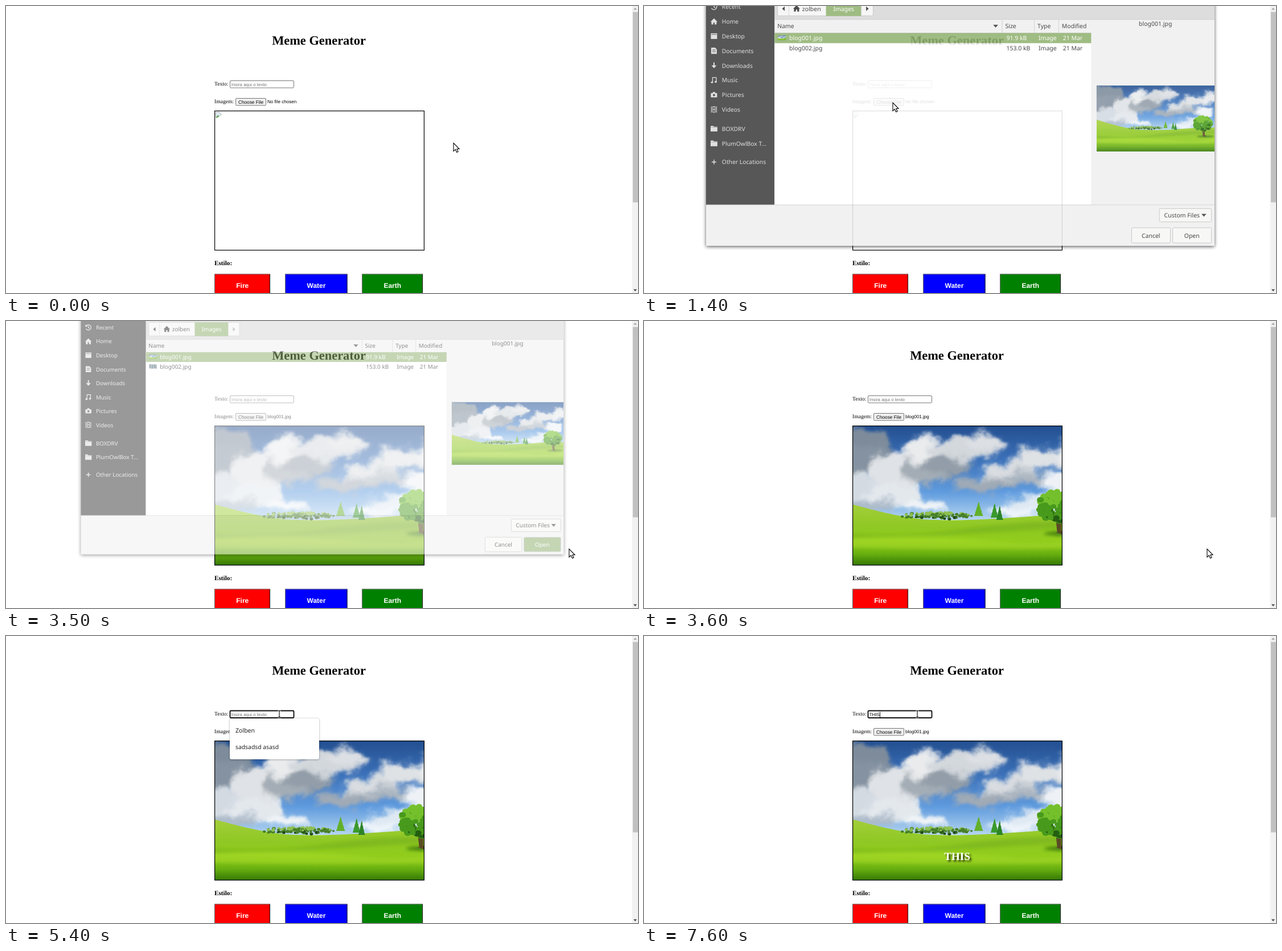
Animation of 1110 by 505 pixels, one loop 8000 ms. Source, as an HTML page:

```html
<!DOCTYPE html>
<html lang="pt">
<head>
<meta charset="utf-8">
<title>Meme Generator</title>
<style>
  html, body { margin: 0; width: 100%; height: 100%; overflow: hidden; background: #fff; }
  svg { display: block; width: 1110px; height: 505px; }
  text { text-rendering: geometricPrecision; white-space: pre; }
  .serif { font-family: "Liberation Serif", serif; font-size: 9.6px; }
  .sans { font-family: "Liberation Sans", sans-serif; font-size: 8.1px; }
  .ui { font-family: "Noto Sans", sans-serif; font-size: 10.55px; fill: #303030; }
  .bold { font-weight: bold; }
  .mid { text-anchor: middle; }
</style>
</head>
<body>
<svg viewBox="0 0 1110 505">
  <defs>
    <linearGradient id="sky" x2="0" y2="1">
      <stop stop-color="#234f90"/><stop offset=".35" stop-color="#3b70b8"/>
      <stop offset=".7" stop-color="#5f9bde"/><stop offset="1" stop-color="#b5d5f0"/>
    </linearGradient>
    <linearGradient id="grass" gradientUnits="userSpaceOnUse" x1="0" y1="318" x2="0" y2="430">
      <stop stop-color="#a5cf3c"/><stop offset=".4" stop-color="#8fc824"/>
      <stop offset=".6" stop-color="#90cc1c"/><stop offset=".82" stop-color="#68b010"/>
      <stop offset="1" stop-color="#347606"/>
    </linearGradient>
    <filter id="puff" x="-10%" y="-10%" width="120%" height="120%">
      <feGaussianBlur stdDeviation="4" result="soft"/>
      <feTurbulence type="fractalNoise" baseFrequency=".028" numOctaves="4" seed="4"/>
      <feDisplacementMap in="soft" scale="34" xChannelSelector="R" yChannelSelector="G"/>
    </filter>
    <filter id="haze"><feGaussianBlur stdDeviation="3"/></filter>
    <filter id="shade" x="-5%" y="-5%" width="110%" height="110%"><feGaussianBlur stdDeviation="3.2"/></filter>
    <symbol id="meadow" viewBox="333 185 436 245" preserveAspectRatio="xMidYMid slice"></symbol>
  </defs>
  <rect width="1110" height="505" fill="#fff"/>
  <g id="page"></g>
  <g id="dialog"></g>
  <g id="popup"></g>
  <path id="arrow" d="M0 0V14.4L3.3 11.4 5.7 16.4 8.1 15.3 5.9 10.5H10Z" fill="#fff" stroke="#000" stroke-width="1.1"/>
  <g id="beam" fill="none">
    <path d="M-3-6Q0-6 0-4.500Q0-6 3-6M0-5V5M-3 6Q0 6 0 4.500Q0 6 3 6" stroke="#fff" stroke-width="2.6"/>
    <path d="M-3-6Q0-6 0-4.500Q0-6 3-6M0-5V5M-3 6Q0 6 0 4.500Q0 6 3 6" stroke="#000" stroke-width="1.1"/>
  </g>
</svg>
<script>
const $ = id => document.getElementById(id);
const rect = (x, y, w, h, fill, more = '') =>
  `<rect x="${x}" y="${y}" width="${w}" height="${h}" fill="${fill}" ${more}/>`;
const label = (x, y, str, cls, more = '') => `<text x="${x}" y="${y}" class="${cls}" ${more}>${str}</text>`;
const path = (d, fill, more = '') => `<path d="${d}" fill="${fill}" ${more}/>`;
const blob = ([x, y, rx, ry, fill]) => `<ellipse cx="${x}" cy="${y}" rx="${rx}" ry="${ry}" fill="${fill}"/>`;

let seed = 7;
const random = () => (seed = seed * 16807 % 2147483647) / 2147483647;

function foliage(count, cx, cy, rx, ry, size, colors) {
  let out = '';
  for (let i = 0; i < count; i++) {
    const a = random() * 2 * Math.PI, r = Math.sqrt(random());
    const dy = r * Math.sin(a);
    const tone = Math.min(2, Math.max(0, Math.floor(1.6 - dy + random() - .5)));
    const s = size * (.6 + .6 * random());
    out += blob([(cx + rx * r * Math.cos(a)).toFixed(1), (cy + ry * dy).toFixed(1), s.toFixed(1), (s * .8).toFixed(1), colors[tone]]);
  }
  return out;
}

function conifer(x, top, half, fill) {
  let d = `M${x} ${top}`;
  for (let i = 1; i <= 4; i++) d += `L${x + half * i / 4} ${top + 6.5 * i}l${-half / 8} 0`;
  d += `H${x}`;
  for (let i = 4; i >= 1; i--) d += `L${x - half * i / 4} ${top + 6.5 * i}L${x - half * (i - 1) / 4} ${top + 6.5 * i - 5}`;
  return path(d + 'Z', fill);
}

function meadow() {
  const clouds = [
    [375, 215, 60, 32, '#7d8b9b'], [350, 255, 50, 32, '#8794a3'], [400, 245, 40, 22, '#8492a1'],
    [445, 265, 50, 32, '#dfe2e6'], [500, 262, 48, 24, '#a4adb6'], [495, 226, 38, 22, '#e9ebed'],
    [560, 226, 60, 20, '#d3d8dd'], [600, 212, 36, 15, '#dcdfe3'], [530, 256, 44, 18, '#929da9'],
    [375, 300, 60, 28, '#d3dae2'], [440, 305, 52, 22, '#e3e8ed'], [400, 325, 45, 10, '#adbccb'],
    [490, 328, 36, 12, '#eef3f7'], [600, 287, 58, 12, '#a0aab6'], [645, 266, 50, 18, '#d9dde1'],
    [700, 240, 48, 19, '#dfe2e5'], [755, 230, 36, 22, '#e6e9ec'], [680, 275, 55, 10, '#a9b4c0'],
    [735, 288, 34, 24, '#eef2f6'], [690, 320, 48, 15, '#dfe9f3'], [650, 337, 40, 9, '#eef4fa']
  ];
  const hill = 'M333 312Q350 316 367 323C405 333 440 343 490 349C560 353 620 348 690 343L769 341V430H333Z';
  return rect(333, 185, 436, 165, 'url(#sky)') +
    `<g filter="url(#puff)">${clouds.map(blob).join('')}</g>` +
    path(hill, 'url(#grass)') +
    `<g filter="url(#haze)">` +
      path('M333 372Q450 382 560 366T769 352V362Q620 372 540 376T333 382Z', '#6ca812', 'opacity=".45"') +
      path('M333 385Q470 376 600 386T769 380V400Q560 404 333 398Z', '#b0e02a', 'opacity=".5"') +
      blob([735, 374, 32, 3, '#2d6b0a']) + '</g>' +
    foliage(110, 512, 343, 66, 6, 3, ['#8fbf52', '#47802a', '#234b17'].reverse()) +
    conifer(588, 317, 8, '#62b02a') + conifer(616, 320, 7, '#3a9a2c') + conifer(625, 324, 6, '#2c8426') +
    path('M723 345L726 372H722L734 375 738 372 733 369V345Z', '#5a4a24') +
    foliage(190, 727, 326, 34, 27, 5.5, ['#245f10', '#489a1c', '#74c02c']);
}

function styleButton(x, w, fill, name) {
  return rect(x, 471.500, w, 40, fill) +
    path(`M${x} 512V472H${x + w}`, 'none', 'stroke="#6b6b6b" stroke-width="1.1"') +
    path(`M${x + w - .5} 472V512`, 'none', 'stroke="#222" stroke-width="1.1"') +
    label(x + w / 2, 496, name, 'sans bold mid', 'fill="#fff" style="font-size:12px"');
}

function page() {
  return label(549.5, 67.5, 'Meme Generator', 'serif bold mid', 'style="font-size:22.4px"') +
    label(366, 140, 'Texto:', 'serif') +
    rect(393.5, 131.5, 112, 12.5, '#fff', 'id="field" rx="1.5" stroke="#767676"') +
    label(395.7, 141, 'Insira aqui o texto', 'sans', 'id="hint" fill="#757575" style="font-size:7.9px"') +
    label(395.7, 141, '', 'sans', 'id="typed" style="font-size:8px"') +
    rect(396.5, 133.5, .9, 9.5, '#000', 'id="caret"') +
    label(366, 171, 'Imagem:', 'serif') +
    rect(403.5, 162.5, 53, 12.5, '#efefef', 'id="choose" rx="1.5" stroke="#767676"') +
    label(430, 171.8, 'Choose File', 'sans mid', 'style="font-size:8.25px"') +
    label(459, 171, 'No file chosen', 'sans', 'id="file"') +
    `<g id="broken">` + path('M368.5 187H375L378 190V196.500H368.500Z', '#dfe9f5', 'stroke="#a9a9a9" stroke-width=".8"') +
      path('M369 196L372 192 375 194 378 191V193L370 196.500Z', '#5aa64a') +
      path('M371 197L379 191V198H371Z', '#fff') + '</g>' +
    `<use id="photo" href="#meadow" x="367" y="185" width="367.500" height="245"/>` +
    rect(366.6, 184.600, 367.800, 245, 'none', 'stroke="#000" stroke-width="1.2"') +
    label(550, 394, '', 'serif bold mid', 'id="caption" fill="#fff" style="font-size:19px;filter:drop-shadow(3px 3px 1.500px rgba(0,0,0,.75))"') +
    label(366, 455.5, 'Estilo:', 'serif bold', 'style="font-size:11.23px"') +
    styleButton(366.5, 97.5, '#f00', 'Fire') +
    styleButton(490.5, 109, '#00f', 'Water') +
    styleButton(625.5, 106.5, '#008000', 'Earth') +
    rect(1099.5, 0, 10.5, 505, '#f1f1f1') + rect(1101, 10.5, 9, 335, '#c1c1c1') +
    path('M1102 6.500L1105 3 1108 6.500Z', '#a3a3a3') + path('M1102 498.500L1105 502 1108 498.500Z', '#404040');
}

const folder = path('M-6-5H-1L0-3.500H6V5H-6Z', '#dcdcdc') + path('M-6-2.500H6', 'none', 'stroke="#8a8a8a" stroke-width=".7"');
const line = (d, w = 1.3) => path(d, 'none', `stroke="#dcdcdc" stroke-width="${w}"`);
const solid = d => path(d, '#dcdcdc', 'fill-rule="evenodd"');
const house = 'M0-5.500L6 .5H4.500V5.500H1.200V2H-1.200V5.500H-4.500V.5H-6Z';
const places = [
  [0, 'Recent', line('M-4-3A5 5 0 1 1-4.500 2.500M-5-5V-2H-2M0-3V.5L2.500 2')],
  [26, 'Home', solid(house)],
  [52, 'Desktop', solid('M-5.500-5H5.500V5H-5.500ZM-4.500-3.500V-2.500H4.500V-3.500Z')],
  [78, 'Documents', solid('M-5-5.500H2L5-2.500V5.500H-5ZM-3-2V-1H3V-2ZM-3 1V2H3V1Z')],
  [104, 'Downloads', solid('M-1-5.500H1V0H4.500L0 5-4.500 0H-1Z')],
  [130, 'Music', line('M-2.500 3.500V-4.500H4V2.500') + blob([-3.5, 3.8, 1.9, 1.6, '#dcdcdc']) + blob([3, 3, 1.9, 1.6, '#dcdcdc'])],
  [156, 'Pictures', solid('M-5.500-3H-2.500L-1.500-5H1.500L2.500-3H5.500V4.500H-5.500ZM0-1.500A2 2 0 1 0 .1-1.500Z')],
  [182, 'Videos', line('M-4.500-5.500V5.500M4.500-5.500V5.500M-2-5.500V5.500M2-5.500V5.500M-2-5H2M-2 0H2M-2 5H2', 1.1)],
  [216, 'BOXDRV', folder],
  [242, 'PlumOwlBox T...', folder],
  [275, 'Other Locations', line('M-4 0H4M0-4V4', 1.5)]
];

function fileRow(y, name, size, more) {
  return [[253, name], [637, size], [694, 'Image'], [737, '21 Mar']]
    .map(([x, str]) => label(x, y, str, 'ui', more)).join('');
}

const uiButton = (x, y, w, h, id = '') =>
  rect(x + .5, y + .5, w - 1, h - 1, '#f6f6f5', `id="${id}" rx="2" stroke="#c2c2c2"`);

function dialog() {
  const white = 'style="fill:#fff"';
  return rect(106, -30, 899, 455, '#000', 'filter="url(#shade)" opacity=".75"') +
    rect(106, -30, 899, 453.5, '#f0f0f0') +
    rect(227, -30, 778, 53, '#d9d9d9') +
    rect(232.5, -9.5, 169, 25.5, '#f5f5f5', 'rx="2" stroke="#c2c2c2"') +
    path('M252.500-9V16M380.500-9V16', 'none', 'stroke="#cfcfcf"') +
    rect(318, -9.5, 62, 26, '#92b372') +
    path('M245-.500V7.500L240.500 3.500Z', '#303030') + path('M389-.500V7.500L393.500 3.500Z', '#303030', 'id="forward"') +
    path(house, '#303030', 'transform="translate(266 3)"') +
    label(276, 7.5, 'zolben', 'ui') + label(331, 7.5, 'Images', 'ui', white) +
    rect(106, -30, 121, 381, '#404040') +
    places.map(([y, name, icon]) => `<g transform="translate(120 ${y})">${icon}</g>` +
      label(134, y + 4, name, 'ui', 'style="fill:#dcdcdc;font-size:10.4px"')).join('') +
    rect(227, 46, 560, 305, '#fff') +
    path('M227 22.500H1005M227 46.500H787M629.500 23V46M686.500 23V46M729.500 23V46', 'none', 'stroke="#cdcdcd"') +
    [[232, 'Name'], [635, 'Size'], [692, 'Type'], [735, 'Modified']]
      .map(([x, str]) => label(x, 38.3, str, 'ui', 'font-weight="500"')).join('') +
    path('M613.500 32H622.500L618 37Z', '#404040') +
    rect(227, 46.500, 560, 18, '#92b372') +
    `<use href="#meadow" x="233" y="51" width="14" height="8"/>` +
    `<g id="thumb">${rect(233, 69, 14, 8, '#8da0ac')}${path('M235 69V75M239 70V77M243 69V76M246 71V77', 'none', 'stroke="#43586a" stroke-width="1.5"')}</g>` +
    fileRow(59.5, 'blog001.jpg', '91.9 kB', white) + fileRow(77.500, 'blog002.jpg', '153.0 kB', '') +
    label(900.500, 33.500, 'blog001.jpg', 'ui mid') +
    `<use href="#meadow" x="796.500" y="139.300" width="208.500" height="117.200"/>` +
    path('M106 351H1005', 'none', 'stroke="#cfcfcf"') +
    uiButton(907, 357, 93, 24.500) + label(916, 373, 'Custom Files', 'ui') + path('M982 367H990.500L986.200 372Z', '#404040') +
    uiButton(858, 391, 69.500, 28) + label(892.500, 409, 'Cancel', 'ui mid') +
    uiButton(930.500, 391, 69.500, 28, 'open') + label(965, 409, 'Open', 'ui mid', 'id="openText"');
}

function popup() {
  return rect(393, 145.500, 157, 72, '#000', 'rx="3" opacity=".4" style="filter:blur(1.500px)"') +
    rect(393, 145, 157, 72, '#fff', 'rx="3"') +
    label(403, 170, 'Zolben', 'ui', 'font-weight="500" style="fill:#202124"') +
    label(403, 199, 'sadsadsd asasd', 'ui', 'font-weight="500" style="fill:#202124;font-size:10.350px"');
}

document.querySelector('#meadow').innerHTML = meadow();
for (const [id, build] of Object.entries({ page, dialog, popup })) $(id).innerHTML = build();

// Each table lists [start time, value...]; a value holds until the next step.
const pointer = [
  [0, 786, 241], [200, 590, 206], [300, 378, 172], [500, 386, 178], [600, 402, 177], [700, 416, 174],
  [800, 428, 172], [900, 435, 170], [1000, 437, 170], [1800, 432, 140], [1900, 420, 92], [2000, 414, 62],
  [2600, 657, 248], [2700, 770, 318], [2800, 868, 368], [2900, 940, 394], [3000, 980, 401], [3100, 997, 402],
  [3200, 993, 402], [3300, 989, 401], [3700, 905, 345], [3800, 760, 262], [3900, 640, 205], [4000, 565, 178],
  [4200, 530, 162], [4300, 502, 148], [4400, 486, 139], [4500, 480, 137]
];
const dialogSteps = [[0, 0, 1], [1400, .88, .9933], [1500, .97, .998], [1600, 1, 1], [3500, .53, .9433], [3600, 0, 1]];
const popupSteps = [[0, 0], [4800, 1], [6000, .5], [6200, 0]];
const caretSteps = [[0, 0], [4600, 1], [5400, 0], [6000, 1], [6600, 0], [6900, 1]];
const typing = [[0, ''], [6900, 'T'], [7200, 'TH'], [7500, 'THI'], [7600, 'THIS']];
const chooseSteps = [[0, '#efefef', '#767676'], [600, '#e5e5e5', '#4f4f4f'], [1000, '#f5f5f5', '#8d8d8d'],
  [1100, '#e5e5e5', '#4f4f4f'], [1600, '#efefef', '#767676']];
const openSteps = [[0, '#f6f6f5', '#303030'], [2900, '#fcfcfc', '#303030'], [3300, '#92b372', '#fff']];

const at = (table, t) => table.findLast(step => step[0] <= t).slice(1);
const show = (id, on) => $(id).style.display = on ? '' : 'none';
const set = (id, attrs) => { for (const k in attrs) $(id).setAttribute(k, attrs[k]); };

function render(t) {
  const [x, y] = at(pointer, t), overField = t >= 4400;
  show('arrow', !overField);
  show('beam', overField);
  set(overField ? 'beam' : 'arrow', { transform: `translate(${x} ${y})` });

  const [alpha, scale] = at(dialogSteps, t);
  show('dialog', alpha);
  set('dialog', { opacity: alpha, transform: `translate(555.400 197) scale(${scale}) translate(-555.400 -197)` });
  show('thumb', t >= 1500);
  set('forward', { fill: t < 1500 ? '#303030' : '#a0a0a0' });
  const [openFill, openInk] = at(openSteps, t);
  set('open', { fill: openFill });
  $('openText').style.fill = openInk;

  const [fill, stroke] = at(chooseSteps, t);
  set('choose', { fill, stroke });
  const loaded = t >= 3500;
  $('file').textContent = loaded ? 'blog001.jpg' : 'No file chosen';
  show('photo', loaded);
  show('broken', !loaded);

  const focused = t >= 4600, [word] = at(typing, t);
  set('field', focused ? { stroke: '#101010', 'stroke-width': 1.9 } : { stroke: '#767676', 'stroke-width': 1 });
  show('hint', !word);
  $('typed').textContent = $('caption').textContent = word;
  show('caret', at(caretSteps, t)[0]);
  set('caret', { x: 396 + (word ? $('typed').getComputedTextLength() - .2 : .5) });

  const [popupAlpha] = at(popupSteps, t);
  show('popup', popupAlpha);
  set('popup', { opacity: popupAlpha });
}

const start = performance.now();
function tick() {
  render((performance.now() - start) % 8000);
  requestAnimationFrame(tick);
}
tick();
</script>
</body>
</html>
```
